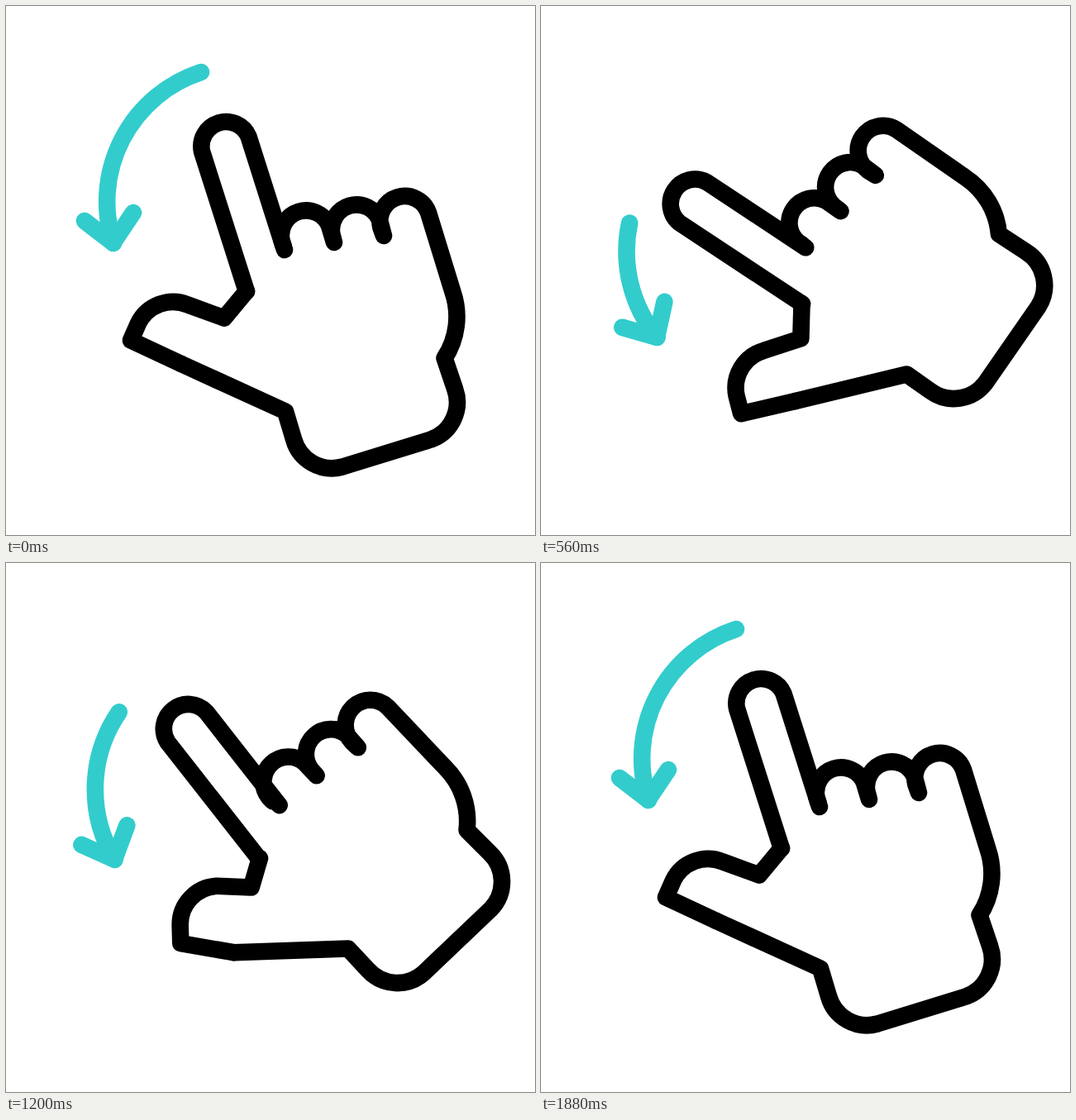
Recreate the animation shown at these times as an HTML page without scripts. Size 640 by 640 pixels, loop 2 s.

```html
<!DOCTYPE html>
<html lang="en">
<head>
<meta charset="utf-8">
<title>Swipe gesture</title>
<style>
  @property --hand { syntax: "<number>"; inherits: true; initial-value: 0; }
  @property --finger { syntax: "<number>"; inherits: true; initial-value: 0; }
  @property --arrow { syntax: "<number>"; inherits: true; initial-value: 0; }

  html, body { margin: 0; width: 100%; height: 100%; overflow: hidden; background: #fff; }

  svg {
    display: block; width: 100%; height: 100%;
    fill: none; stroke: #000; stroke-width: 20.6;
    stroke-linecap: round; stroke-linejoin: round;
    animation: hand 2s infinite, finger 2s infinite, arrow 2s infinite;
    animation-timing-function: cubic-bezier(.37, 0, .63, 1);
  }

  .hand {
    transform-origin: 325px 317px;
    transform: rotate(calc(var(--hand) * -1deg));
  }
  /* the finger trails the hand */
  .finger {
    transform-origin: 308px 332px;
    transform: rotate(calc((var(--hand) - var(--finger)) * 1deg));
  }
  .thumb { animation: thumb 2s cubic-bezier(.37, 0, .63, 1) infinite; }
  .arrow {
    stroke: #33cccc;
    transform-origin: 436px 316px;
    transform: rotate(calc(var(--arrow) * -1deg));
  }
  /* the tail shortens as the arrow swings down */
  .tail {
    stroke-dasharray: 89.6 300;
    stroke-dashoffset: calc(var(--arrow) * 1.79);
  }

  @keyframes hand {
    0%, 4%, 43.4%, 92.2%, 100% { --hand: 0; }
    25.4%, 71.1% { --hand: 40.2; }
  }
  @keyframes finger {
    0%, 4%, 46.2%, 93.6%, 100% { --finger: 0; }
    26.5%, 73.3% { --finger: 39.5; }
  }
  @keyframes arrow {
    0%, 4%, 43.9%, 92%, 100% { --arrow: 0; }
    26.3%, 72.2% { --arrow: 22; }
  }
  @keyframes thumb {
    0%, 4%, 25%, 43.4%, 71.3%, 100% {
      d: path("M212 433L151 404.5L160 384A47 47 0 0 1 220 361.5L264 377.5L291 345");
    }
    14.5%, 59.5% {
      d: path("M212 433L159.5 394.5L168.5 375A47 47 0 0 1 229 351.5L266 372L291 345");
    }
  }
</style>
</head>
<body>
<svg viewBox="0 0 640 640" role="img" aria-label="Hand swiping down">
  <g class="arrow">
    <path class="tail" pathLength="89.6" d="M130 287A165 165 0 0 1 236 80"/>
    <path d="M95 260L129.5 286.5L154 250"/>
  </g>
  <g class="hand">
    <path d="M212 433L338 490.5L348 524A48 48 0 0 0 407 557.5L514 524.5A48 48 0 0 0 543 463
      L530.5 426A92 92 0 0 0 540.5 346L511 250A30.2 30.2 0 0 0 453.4 268L457 278
      L452 259A30.2 30.2 0 0 0 394.4 276L397 286
      L391 266A30.2 30.2 0 0 0 333.6 284L335.5 290"/>
    <path class="thumb" d="M212 433L151 404.5L160 384A47 47 0 0 1 220 361.5L264 377.5L291 345"/>
    <path class="finger" d="M291 345.5L237 176A29.8 29.8 0 0 1 293.5 158L337 295"/>
  </g>
</svg>
</body>
</html>
```
